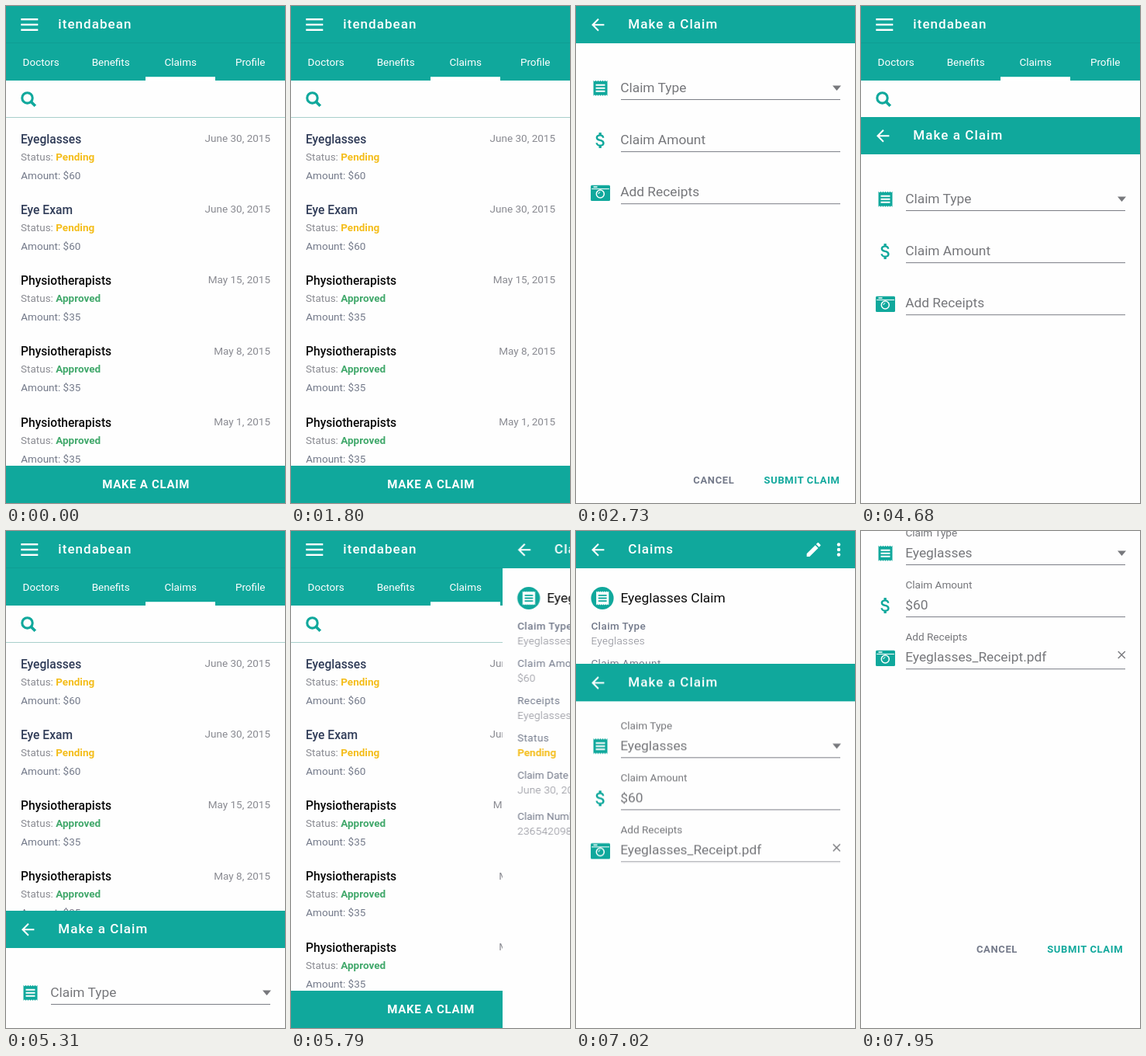
Write an HTML page that moves like this. It is 360x640 px and loops after 8 s.

```html
<!DOCTYPE html>
<html lang="en">
<head>
<meta charset="utf-8">
<title>Claims app</title>
<style>
  html, body { margin: 0; width: 100%; height: 100%; overflow: hidden; background: #fefefe; }
  svg { display: block; width: 360px; height: 640px; font-family: Roboto, "Open Sans", sans-serif; }
  .teal { fill: #10a89c; }
  .page { fill: #fefefe; }
  .white { fill: #fff; }
  .edge { fill: #000; opacity: .06; }
  .title { font-size: 17px; font-weight: 500; letter-spacing: 1.05px; fill: #fff; }
  .tab { font-size: 13.5px; fill: #fff; text-anchor: middle; }
  .cta { font-size: 15px; font-weight: 700; letter-spacing: .7px; fill: #fff; text-anchor: middle; }
  .name { font-size: 15.6px; font-weight: 500; fill: #0a0a0a; }
  .new { fill: #2f3b57; }
  .small { font-size: 13.5px; fill: #898a91; }
  .slate { fill: #747a8a; }
  .end { text-anchor: end; }
  .pending, .approved { font-weight: 700; fill: #f4bd1a; }
  .approved { fill: #41a86b; }
  .field { font-size: 17.35px; fill: #76777b; }
  .label { font-size: 13.6px; fill: #76777b; }
  .rule { fill: #7b7d85; }
  .action { font-size: 13px; font-weight: 700; letter-spacing: .64px; }
  .heading { font-size: 17.4px; fill: #0a0a0a; }
  .key { letter-spacing: .4px; fill: #737a8b; }
  .value { font-weight: 300; letter-spacing: .35px; fill: #83848e; }
  .line { fill: none; stroke-linecap: butt; }

  #sheet, #detail, #edit { animation: 8s linear infinite; }
  #sheet { animation-name: sheet; }
  #detail { animation-name: detail; }
  #edit { animation-name: edit; }

  @keyframes sheet {
    0%, 22.875% { transform: translateY(640px); animation-timing-function: cubic-bezier(.333, .8, .667, 1); }
    34.125%, 56.7% { transform: translateY(0); }
    58.5%, 59.25% { transform: translateY(143px); animation-timing-function: cubic-bezier(.333, .37, .667, .71); }
    66.375%, 67.125% { transform: translateY(489px); animation-timing-function: cubic-bezier(.333, .45, .667, .9); }
    71.25%, 100% { transform: translateY(640px); }
  }
  @keyframes detail {
    0%, 71.25% { transform: translateX(360px); animation-timing-function: cubic-bezier(.333, .54, .667, .87); }
    78%, 78.375% { transform: translateX(18px); animation-timing-function: ease-out; }
    80%, 100% { transform: translateX(0); }
  }
  @keyframes edit {
    0%, 80.25% { transform: translateY(640px); animation-timing-function: cubic-bezier(.333, .6, .667, 1); }
    97.5%, 100% { transform: translateY(-77px); }
  }
</style>
</head>
<body>
<svg viewBox="0 0 360 640">
  <defs>
    <path id="back" d="M20 11H7.83l5.59-5.59L12 4l-8 8 8 8 1.41-1.41L7.83 13H20z"/>
    <path id="receipt" d="M18 17H6v-2h12zm0-4H6v-2h12zm0-4H6V7h12zM3 22l1.5-1.5L6 22l1.5-1.5L9 22l1.5-1.5L12 22l1.5-1.5L15 22l1.5-1.5L18 22l1.5-1.5L21 22V2l-1.5 1.5L18 2l-1.5 1.5L15 2l-1.5 1.5L12 2l-1.5 1.5L9 2 7.5 3.5 6 2 4.5 3.5 3 2z"/>
    <path id="dollar" d="M11.8 10.9c-2.27-.59-3-1.2-3-2.15 0-1.09 1.01-1.85 2.7-1.85 1.78 0 2.44.85 2.5 2.1h2.21c-.07-1.72-1.12-3.3-3.21-3.81V3h-3v2.16c-1.94.42-3.5 1.68-3.5 3.61 0 2.31 1.91 3.46 4.7 4.13 2.5.6 3 1.48 3 2.41 0 .69-.49 1.79-2.7 1.79-2.06 0-2.87-.92-2.98-2.1h-2.2c.12 2.19 1.76 3.42 3.68 3.83V21h3v-2.15c1.95-.37 3.5-1.5 3.5-3.55 0-2.84-2.43-3.81-4.7-4.4z"/>
    <path id="pencil" d="M3 17.25V21h3.75L17.81 9.94l-3.75-3.75zM20.71 7.04c.39-.39.39-1.02 0-1.41l-2.34-2.34c-.39-.39-1.02-.39-1.41 0l-1.83 1.83 3.75 3.75z"/>
    <g id="camera">
      <rect class="teal" x="19" y="230.7" width="25" height="20.3" rx="1.5"/>
      <path class="white" d="M20 235h23v1.1H20zM22.5 232.3h5v1.4h-5z"/>
      <circle class="line" cx="31.3" cy="242" r="5" stroke="#fff" stroke-width="1.5"/>
      <path class="line" d="M29 242a2.3 2.3 0 0 1 2.3-2.3" stroke="#fff"/>
    </g>
  </defs>
  <g id="list"></g>
  <g id="sheet"></g>
  <g id="detail"></g>
  <g id="edit"></g>
</svg>
<script>
  const text = (x, y, cls, s) => `<text x="${x}" y="${y}" class="${cls}">${s}</text>`;
  const rect = (x, y, w, h, cls) => `<rect x="${x}" y="${y}" width="${w}" height="${h}" class="${cls}"/>`;
  const icon = (id, x, y, cls, k = 1) =>
    `<use href="#${id}" transform="translate(${x} ${y}) scale(${k})" class="${cls}"/>`;
  const fill = (id, parts) => { document.getElementById(id).innerHTML = parts.join(''); };

  const bar = title => rect(0, 0, 360, 640, 'page') + rect(0, 0, 360, 48, 'teal') +
    icon('back', 16, 12, 'white', 1.02) + text(67.3, 29, 'title', title);

  // Claims list
  const claims = [
    ['Eyeglasses', 'Pending', 60, 'June 30'],
    ['Eye Exam', 'Pending', 60, 'June 30'],
    ['Physiotherapists', 'Approved', 35, 'May 15'],
    ['Physiotherapists', 'Approved', 35, 'May 8'],
    ['Physiotherapists', 'Approved', 35, 'May 1']
  ];
  const row = ([name, status, sum, day], i) => {
    const y = i * 91.2, state = status.toLowerCase();
    return text(19, 176.7 + y, status === 'Pending' ? 'name new' : 'name', name) +
      text(341, 174.9 + y, 'small end', day + ', 2015') +
      text(19, 198.7 + y, 'small', `Status: <tspan class="${state}">${status}</tspan>`) +
      text(19.3, 222.7 + y, 'small slate', 'Amount: $' + sum);
  };
  fill('list', [
    rect(0, 0, 360, 640, 'page'),
    rect(0, 0, 360, 96, 'teal'),
    rect(0, 47, 360, 1, 'edge'),
    ...[16, 22.8, 29.6].map(y => rect(19.3, y, 22, 2.4, 'white')),
    text(67.3, 29, 'title', 'itendabean'),
    ...['Doctors', 'Benefits', 'Claims', 'Profile'].map((s, i) => text(45.2 + i * 90, 76.5, 'tab', s)),
    rect(180, 91.2, 90, 4.8, 'white'),
    '<g class="line" stroke="#10a89c"><circle cx="27.5" cy="118.4" r="6.7" stroke-width="3.1"/>' +
      '<path d="M32 123l5.8 5.8" stroke-width="3.7"/></g>',
    '<rect y="143" width="360" height="1" fill="#a9cfcb"/>',
    ...claims.map(row),
    rect(0, 592, 360, 48, 'teal'),
    text(180.7, 621, 'cta', 'MAKE A CLAIM')
  ]);

  // Claim form, blank or filled in
  const names = ['Claim Type', 'Claim Amount', 'Add Receipts'];
  const form = (values, dx, dy) => [
    bar('Make a Claim'),
    icon('receipt', 19.5, 93.8, 'teal'),
    icon('dollar', 18.5, 159.8, 'teal', 1.1),
    '<use href="#camera"/>',
    ...names.map((s, i) => {
      const y = i * 67.1;
      return (values ? text(57.4, 83.9 + y, 'label', s) : '') +
        text(57.2, 110.9 + y, 'field', values ? values[i] : s) +
        rect(58, 120 + y, 283, 1, 'rule');
    }),
    '<path d="M331 102.5h11l-5.5 6.5z" fill="#77787c"/>',
    values ? '<path class="line" d="M331.8 232l9 9m0-9l-9 9" stroke="#77787c" stroke-width="1.4"/>' : '',
    text(151.3 + dx, 615.3 + dy, 'action slate', 'CANCEL'),
    text(242.6 + dx, 615.3 + dy, 'action teal', 'SUBMIT CLAIM')
  ];
  fill('sheet', form(null, 0, 0));
  fill('edit', form(['Eyeglasses', '$60', 'Eyeglasses_Receipt.pdf'], -2.4, 4.6));

  // Claim detail
  const key = (y, s, attr = '') => text(19.4, y, 'small ' + attr, s);
  fill('detail', [
    bar('Claims'),
    icon('pencil', 294.7, 12, 'white'),
    ...[17.5, 24, 30.5].map(y => `<circle cx="339" cy="${y}" r="2.2" class="white"/>`),
    '<circle cx="34" cy="86.5" r="14.6" class="teal"/>',
    icon('receipt', 23.4, 75.7, 'white', .9),
    text(57.4, 92, 'heading', 'Eyeglasses Claim'),
    `<g font-weight="500">${key(127, 'Claim Type', 'key')}</g>`,
    key(146, 'Eyeglasses', 'value'),
    key(175, 'Claim Amount', 'key'),
    key(194, '$60', 'value'),
    key(223, 'Receipts', 'key'),
    key(242, 'Eyeglasses_Receipt.pdf', 'value'),
    key(271, 'Status', 'key'),
    key(290, 'Pending', 'pending'),
    key(319, 'Claim Date', 'slate'),
    key(338, 'June 30, 2015', 'value'),
    key(371.5, 'Claim Number', 'slate'),
    key(390.8, '236542098', 'value')
  ]);
</script>
</body>
</html>
```
